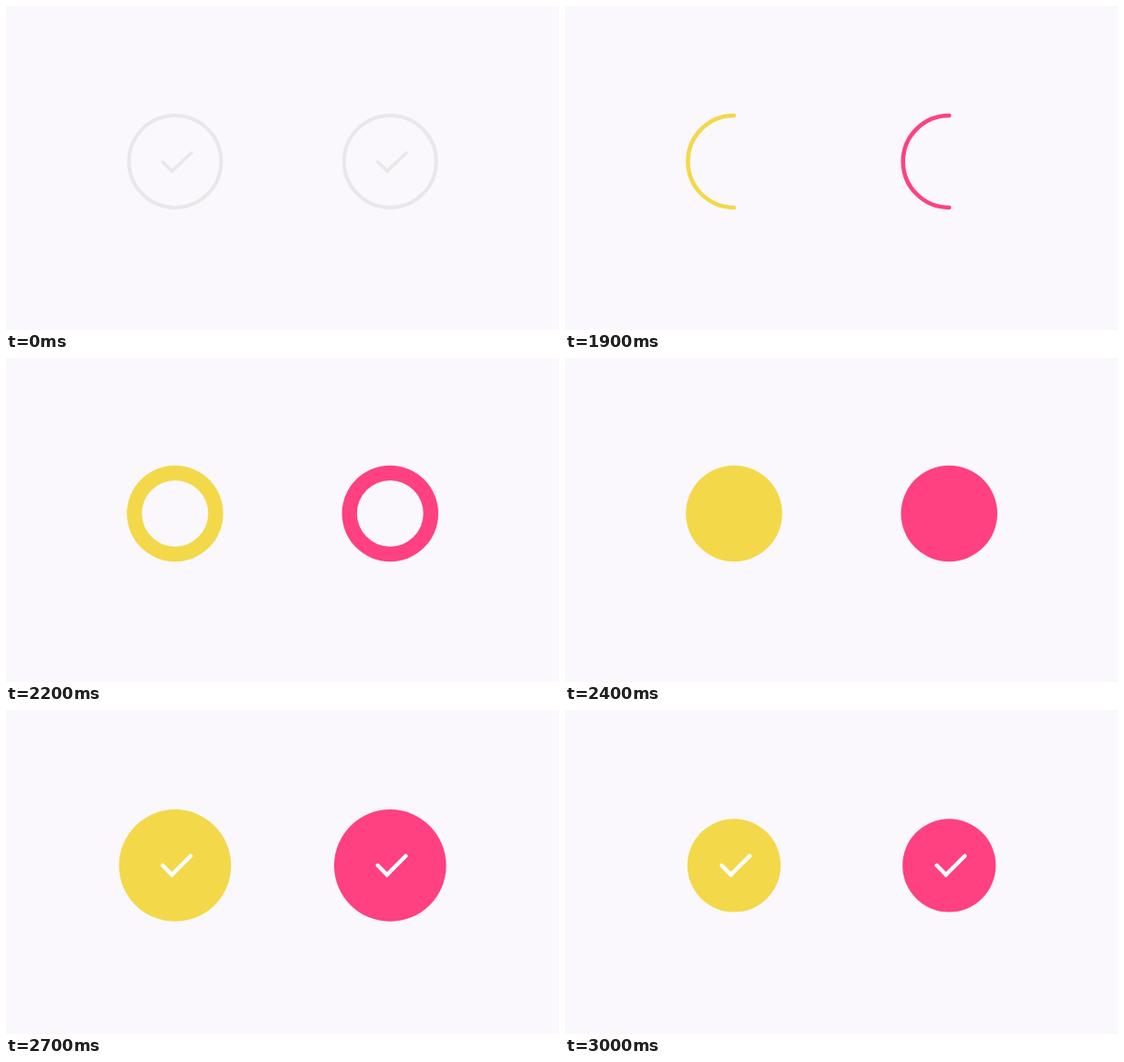
Write an HTML page that moves like this. It is 600x352 px and loops after 3200 ms.

```html
<!DOCTYPE html>
<html lang="en">
<head>
<meta charset="utf-8">
<title>Check buttons</title>
<style>
  html, body { margin: 0; width: 100%; height: 100%; overflow: hidden; background: #faf8fc; }
  svg { display: block; width: 100vw; height: 100vh; }
  .arc, .idle, .check { fill: none; stroke-linecap: round; }
  .arc { stroke-width: 4.5; }
  .idle { stroke: #eae7ea; stroke-width: 4; }
  .check { stroke: #fff; stroke-width: 4.3; }
  .hole { fill: #faf8fc; }
</style>
</head>
<body>
<svg id="stage" viewBox="0 0 600 352"></svg>
<script>
const LOOP = 3200, STEP = 100;
const RING = 50, OUTER = 52.25, INNER = 48;
const stage = document.getElementById('stage');

function add(parent, tag, attrs) {
  const el = document.createElementNS('http://www.w3.org/2000/svg', tag);
  for (const key in attrs) el.setAttribute(key, attrs[key]);
  parent.append(el);
  return el;
}

const clamp = x => Math.min(1, Math.max(0, x));
const ramp = (t, start, length) => clamp((t - start) / length);
const show = (el, on) => el.setAttribute('visibility', on ? 'visible' : 'hidden');

function makeButton(x, color) {
  const g = add(stage, 'g', { transform: `translate(${x} 168.9)` });
  const idle = add(g, 'g', { class: 'idle' });
  add(idle, 'circle', { r: RING });
  add(idle, 'path', { d: 'M-13.4 .6L-3.4 10.4L17.6 -9.2', 'stroke-width': 3.6 });
  // Starts at the bottom and runs clockwise
  const arc = add(g, 'path', {
    class: 'arc', stroke: color, pathLength: 100,
    d: `M0 ${RING}A${RING} ${RING} 0 0 1 0 ${-RING}A${RING} ${RING} 0 0 1 0 ${RING}`
  });
  const disc = add(g, 'circle', { fill: color });
  const hole = add(g, 'circle', { class: 'hole' });
  const check = add(g, 'g', { class: 'check' });
  for (const d of ['M-13.5 -.2L-3.4 10.2', 'M-3.4 10.2L17 -10.4'])
    add(check, 'path', { d });
  return { idle, arc, disc, hole, check };
}

const buttons = [makeButton(183.4, '#f3d84a'), makeButton(416.8, '#ff4081')];

// Time and radius of the disc as it swells and settles
const pulse = [[2550, OUTER], [2600, 57.2], [2700, 60.8], [2800, 56.4], [2900, 52.2], [3000, 50.6]];

function radius(t) {
  if (t <= pulse[0][0]) return OUTER;
  for (let i = 1; i < pulse.length; i++) {
    const [t0, r0] = pulse[i - 1], [t1, r1] = pulse[i];
    if (t <= t1) return r0 + (r1 - r0) * ramp(t, t0, t1 - t0);
  }
  return pulse[pulse.length - 1][1];
}

function draw(t) {
  const sweep = ramp(t, 1650, 500);
  const hole = INNER * (1 - ramp(t, 2150, 200));
  const alpha = ramp(t, 2550, 110);
  for (const b of buttons) {
    show(b.idle, t < 1700);
    show(b.arc, t >= 1700 && sweep < 1);
    b.arc.setAttribute('stroke-dasharray', `${sweep * 100} 200`);
    show(b.disc, sweep === 1);
    b.disc.setAttribute('r', radius(t));
    show(b.hole, sweep === 1 && hole > 0);
    b.hole.setAttribute('r', hole);
    for (const line of b.check.children) line.setAttribute('stroke-opacity', alpha);
  }
}

const start = performance.now();
function tick() {
  const t = Math.max(0, performance.now() - start) % LOOP;
  draw(Math.floor(t / STEP) * STEP);
  requestAnimationFrame(tick);
}
tick();
</script>
</body>
</html>
```
